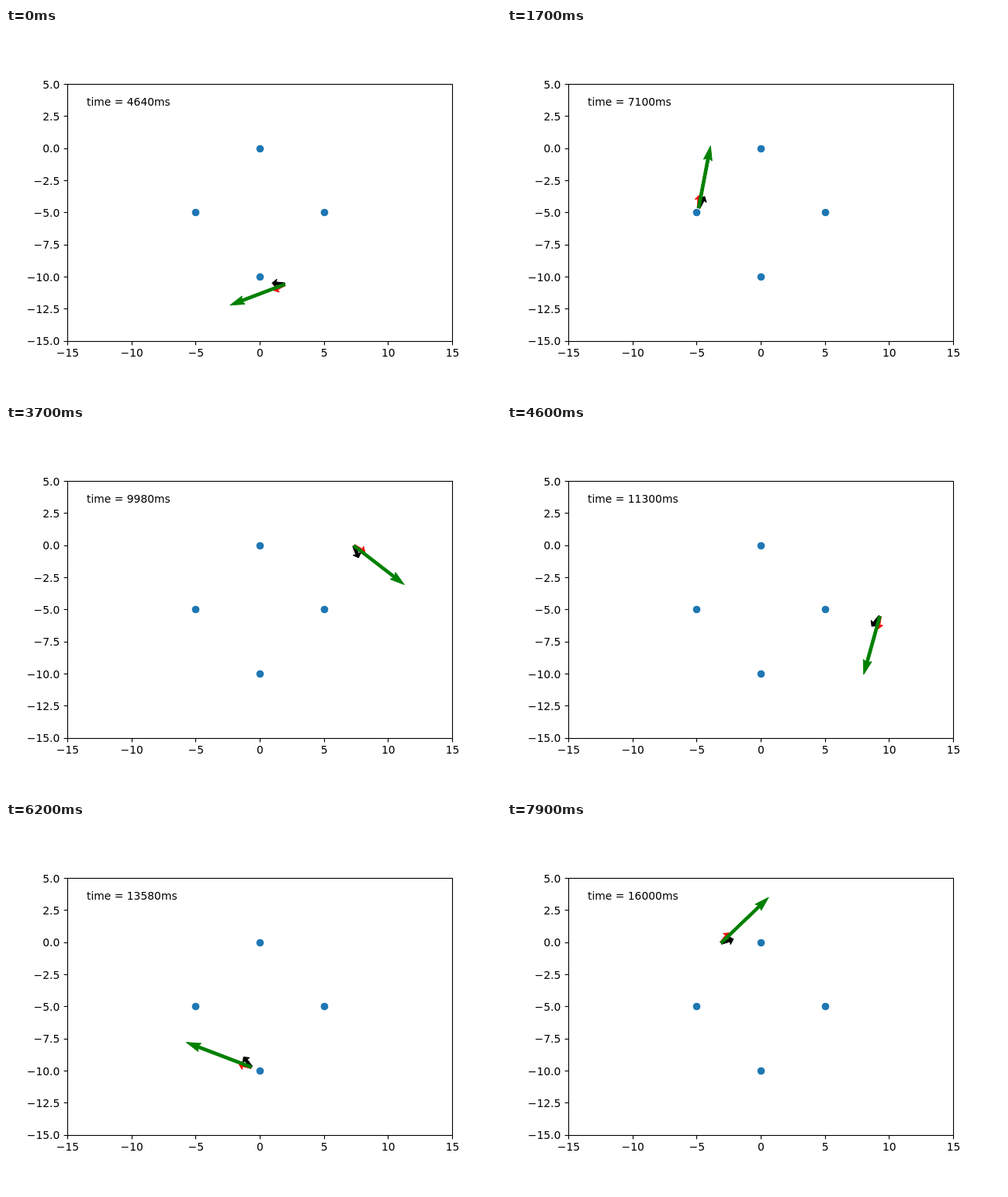
Recreate the animation shown at these times as an HTML page. Size 638 by 475 pixels, loop 8000 ms.

```html
<!DOCTYPE html>
<html lang="en">
<head>
<meta charset="utf-8">
<style>
  html, body { margin: 0; width: 100%; height: 100%; overflow: hidden; background: #fff; }
  svg { display: block; width: 638px; height: 475px; }
  text { font: 13.89px "DejaVu Sans", sans-serif; fill: #000; }
</style>
</head>
<body>
<svg id="plot" viewBox="0 0 638 475">
  <g id="dots" fill="#1f77b4"></g>
  <path id="red" fill="#f00" stroke="#f00"/>
  <path id="black" fill="#000" stroke="#000"/>
  <path id="green" fill="#008000" stroke="#008000"/>
  <g id="axes" fill="none" stroke="#000" stroke-width="1.11"></g>
  <text id="label" x="104" y="100"></text>
</svg>
<script>
const LOOP = 8000, STEP = 100, SHAFT = 3.72, UNIT = 16.533, RAD = Math.PI / 180;
const { sin, cos } = Math;
const byId = id => document.getElementById(id);
const px = x => 327 + x * UNIT;
const py = y => 154.73 - y * UNIT;
const snap = v => Math.round(v) + 0.5;

function add(parent, tag, attrs, text) {
  const el = document.createElementNS("http://www.w3.org/2000/svg", tag);
  for (const key in attrs) el.setAttribute(key, attrs[key]);
  if (text) el.textContent = text;
  byId(parent).appendChild(el);
}

function buildAxes() {
  const minus = s => s.replace("-", "\u2212");
  add("axes", "rect", { x: 79.5, y: 72.5, width: 496, height: 331 });
  for (let x = -15; x <= 15; x += 5) {
    add("axes", "path", { d: `M${snap(px(x))} 403.5v4.86` });
    add("plot", "text", { x: px(x) + 0.5, y: 423, "text-anchor": "middle" }, minus(String(x)));
  }
  for (let y = -15; y <= 5; y += 2.5) {
    add("axes", "path", { d: `M79.5 ${snap(py(y))}h-4.86` });
    add("plot", "text", { x: 69.3, y: Math.ceil(py(y) + 5), "text-anchor": "end" }, minus(y.toFixed(1)));
  }
  for (let i = 0; i < 4; i++) {
    const a = i * 90 * RAD;
    add("dots", "circle", { cx: snap(px(5 * cos(a))), cy: snap(py(5 * sin(a) - 5)), r: 4.86 });
  }
}

// The clock runs unevenly: [step, ms] points joined by straight lines.
const CLOCK = [[0, 4640], [10, 6120], [25, 8240], [37, 9980], [55, 12620], [68, 14420], [79, 16000]];

function clockAt(step) {
  const i = Math.max(1, CLOCK.findIndex(k => k[0] >= step));
  const [s0, c0] = CLOCK[i - 1], [s1, c1] = CLOCK[i];
  return Math.round((c0 + (c1 - c0) * (step - s0) / (s1 - s0)) / 20) * 20;
}

// A steady circuit around a slowly swaying centre; t in seconds.
function position(t) {
  const turn = 0.796 * (t - 0.515);
  const centreX = 345.5 + 2.4 * t - 26 * cos(0.57 * t);
  const centreY = 235.5 - 1.1 * t - 5 * sin(0.95 * t);
  return [centreX - 100 * sin(turn), centreY + 103 * cos(turn)];
}

function velocity(t) {
  const h = 0.005, [x0, y0] = position(t - h), [x1, y1] = position(t + h);
  return [(x1 - x0) / (2 * h), (y1 - y0) / (2 * h)];
}

function arrow(id, [x, y], angle, length, head, joint) {
  const c = cos(angle), n = sin(angle), h = SHAFT / 2;
  const points = [[0, h], [length - joint, h], [length - head, 3 * h], [length, 0],
    [length - head, -3 * h], [length - joint, -h], [0, -h]];
  const d = points.map(([u, v]) => `${(x + u * c - v * n).toFixed(2)} ${(y + u * n + v * c).toFixed(2)}`);
  byId(id).setAttribute("d", `M${d.join("L")}Z`);
}

function render(ms) {
  const clock = clockAt(Math.floor(ms % LOOP / STEP));
  const t = (clock - CLOCK[0][1]) / 1000;
  const at = position(t), [vx, vy] = velocity(t);
  const course = Math.atan2(vy, vx), heading = (45.5 * t - 174) * RAD;
  arrow("red", at, course - 7 * RAD, UNIT, 5.6, 5.2);
  arrow("black", at, heading, UNIT, 5.6, 5.2);
  arrow("green", at, course, Math.hypot(vx, vy), SHAFT * 5, SHAFT * 4.5);
  byId("label").textContent = `time = ${clock}ms`;
}

buildAxes();
const start = performance.now();
function tick() {
  render(performance.now() - start);
  requestAnimationFrame(tick);
}
render(0);
requestAnimationFrame(tick);
</script>
</body>
</html>
```
